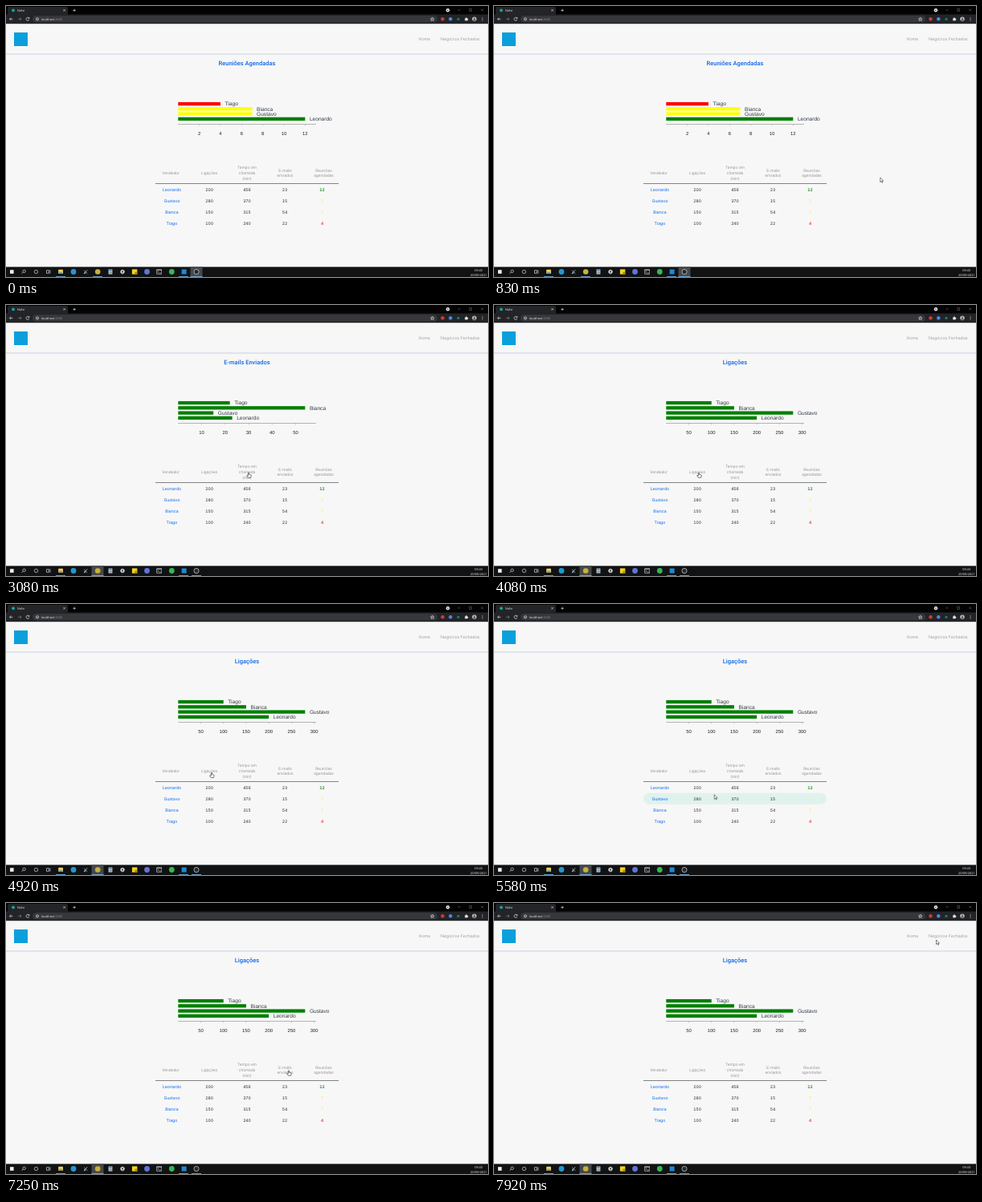
These frames come from a looping animation (600x338 px, 8 s). An HTML page:

```html
<!DOCTYPE html>
<html lang="pt-BR">
<head>
<meta charset="utf-8">
<title>Nolvi</title>
<style>
html, body { margin: 0; width: 100%; height: 100%; overflow: hidden; background: #f7f7f7; }
svg { display: block; width: 100vw; height: 100vh; }
text { font-family: Inter, sans-serif; text-rendering: geometricPrecision; }
.mid { text-anchor: middle; }
.nav { font-size: 5.25px; font-weight: 300; fill: #888; }
.head { font-size: 4.8px; font-weight: 300; fill: #777; }
.cell { font-size: 5px; fill: #222; font-variant-numeric: tabular-nums; }
.grade { font-weight: 600; }
.name { font-size: 5.2px; fill: #0a6cf0; }
.title { font: 500 7.5px Roboto, sans-serif; fill: #1066e6; }
.label { font: 6.6px "Liberation Sans", sans-serif; fill: #333c48; }
.tick { font: 5.9px "Liberation Sans", sans-serif; fill: #222; }
.ui { font: 3.9px "Open Sans", sans-serif; fill: #f0f0f0; }
.line { fill: none; stroke: #ddd; stroke-width: .7; }
</style>
</head>
<body>
<svg viewBox="0 0 600 338">
  <g id="page"></g>
  <g id="chart"></g>
  <g id="table"></g>
  <g id="browser"></g>
  <g id="taskbar"></g>
  <path id="arrow" d="M0 0V5.6L1.3 4.4 2.2 6.4 3.1 6 2.2 4.1H4Z" fill="#fff" stroke="#222" stroke-width=".55"/>
  <path id="hand" d="M-.6 .2Q0-.5 .6 .2V2.4L2.6 2.8Q3.4 3 3.3 3.8L2.7 6.3H-.7L-2.3 3.9Q-2.1 3-1.3 3.5L-.6 4Z" fill="#fff" stroke="#222" stroke-width=".6"/>
</svg>
<script>
const $ = id => document.getElementById(id);
const rect = (x, y, w, h, fill, r = 0) => `<rect x="${x}" y="${y}" width="${w}" height="${h}" rx="${r}" fill="${fill}"/>`;
const dot = (x, y, r, fill) => `<circle cx="${x}" cy="${y}" r="${r}" fill="${fill}"/>`;
const ring = (x, y, r) => `<circle class="line" cx="${x}" cy="${y}" r="${r}"/>`;
const line = d => `<path class="line" d="${d}"/>`;
const text = (x, y, s, cls, fill) => `<text x="${x}" y="${y}" class="${cls}"${fill ? ` style="fill:${fill}"` : ''}>${s}</text>`;

// calls, minutes, e-mails, meetings
const sellers = [
  ['Leonardo', 200, 456, 23, 12],
  ['Gustavo', 280, 370, 15, 7],
  ['Bianca', 150, 315, 54, 7],
  ['Tiago', 100, 240, 22, 4]
];
const charts = {
  1: ['Ligações', 50],
  2: ['Tempo em Chamada', 100],
  3: ['E-mails Enviados', 10],
  4: ['Reuniões Agendadas', 2]
};
const grade = n => n < 5 ? 'red' : n < 10 ? '#ff0' : 'green';

function drawPage() {
  $('page').innerHTML = rect(0, 22, 600, 304, '#f7f7f7') +
    rect(10, 33, 17, 17, '#0b9fdc') +
    text(513.5, 43, 'Home', 'nav') + text(541, 43, 'Negócios Fechados', 'nav') +
    rect(0, 59.6, 600, .8, '#b9c4dd');
}

function drawChart(col) {
  const [title, step] = charts[col];
  const x0 = 214.3, width = 171.7;
  const max = Math.max(...sellers.map(s => s[col]));
  const scale = 158 / max;
  let out = text(300, 74, title, 'title mid');
  sellers.forEach((s, i) => {
    const y = 140.85 - i * 6.26, w = s[col] * scale;
    out += rect(x0, y - 2.15, w, 4.3, col == 4 ? grade(s[4]) : 'green') +
      text(x0 + w + 5.6, y + 2.4, s[0], 'label');
  });
  out += rect(x0, 147.1, width, .7, '#999');
  for (let v = step; v * scale < width; v += step) {
    const x = x0 + v * scale;
    out += rect(x - .25, 147.5, .5, 1.8, '#999') + text(x, 161, v, 'tick mid');
  }
  $('chart').innerHTML = out;
}

function drawTable(hover) {
  const heads = [
    [205, 'Vendedor'], [253, 'Ligações'], [300, 'Tempo em', 'chamada', '(min)'],
    [347.5, 'E-mails', 'enviados'], [395.5, 'Reuniões', 'agendadas']
  ];
  const cols = [206.5, 253.2, 300, 347, 393.5];
  let out = '';
  for (const [x, ...lines] of heads)
    lines.forEach((s, i) => out += text(x, 210 + (i - (lines.length - 1) / 2) * 6.6, s, 'head mid'));
  out += rect(186, 221, 228, .8, '#666');
  sellers.forEach((s, r) => {
    const y = 228.7 + r * 14.05;
    if (r === hover) out += rect(186, y - 7, 228, 14, '#dff2ee', 7);
    s.forEach((v, c) => {
      const cls = c == 4 ? 'cell grade' : c ? 'cell' : 'name';
      const fill = c == 4 ? { red: '#e33', green: '#137c13' }[grade(v)] || '#f7ef6a' : '';
      out += text(cols[c], y + 1.8, v, cls + ' mid', fill);
    });
  });
  $('table').innerHTML = out;
}

function drawBrowser() {
  const bar = '#222427';
  $('browser').innerHTML = rect(0, 0, 600, 11, '#030303') + rect(2, 1, 75, 12, bar, 2) +
    rect(0, 10.5, 600, 11.7, bar) + rect(33, 12, 504, 8.6, '#35373b', 4.3) +
    dot(9, 5.4, 1.9, '#1aa6a6') + text(14, 6.9, 'Nolvi', 'ui') +
    line('M71.4 4.2l2.4 2.4m0-2.4l-2.4 2.4M83.4 5.4h3.4M85.1 3.7v3.4') +
    dot(550, 5.2, 2.2, '#eee') + dot(550, 5.2, .8, '#222') +
    `<g opacity=".4">${line('M562.5 5h3M576.8 3.6h2.8v2.8h-2.8zM591.4 3.7l2.6 2.6m0-2.6l-2.6 2.6')}</g>` +
    line('M8.5 16.3H4.5l1.8-1.8M4.5 16.3l1.8 1.8M28.6 15a2 2 0 1 0 .3 2M29 14v1.6h-1.6') +
    `<g opacity=".5">${line('M15 16.3h4l-1.8-1.8M19 16.3l-1.8 1.8')}</g>` +
    ring(39, 16.3, 1.6) + rect(38.7, 15.9, .6, 1.4, '#ddd') +
    text(44, 17.8, 'localhost<tspan fill="#8b8d91">:3000</tspan>', 'ui') +
    line('M530.7 14.2l.6 1.5 1.6.1-1.2 1 .4 1.6-1.4-.9-1.4.9.4-1.6-1.2-1 1.6-.1z') +
    dot(543.5, 16.3, 2.2, '#d33b35') + dot(553.3, 16.3, 2.2, '#4f86e8') + dot(563, 16.3, 1.6, '#188080') +
    rect(571.3, 15.2, 3.3, 3.1, '#eee', .4) + dot(573, 15, .8, '#eee') + dot(574.7, 16.7, .8, '#eee') +
    dot(583, 16.3, 2.7, '#ccc5bd') + dot(583, 15.6, 1, '#5e4b43') +
    '<path d="M581.2 18.3a1.8 1.8 0 0 1 3.6 0z" fill="#3d4250"/>' +
    [14.7, 16.3, 17.9].map(y => dot(593, y, .5, '#ddd')).join('');
}

function drawTaskbar(focus) {
  const y = 331.5, top = 325.4;
  let out = rect(0, top, 600, 13, '#101214') + rect(focus - 7.5, top, 15, 13, '#45484b');
  for (const x of [68, 114, 221, 237])
    out += rect(x - (x == focus ? 7.5 : 6), 337.2, x == focus ? 15 : 12, .8, '#76b9ed');
  out += rect(5, 329.2, 4.6, 4.6, '#eee') +
    ring(22.6, 330.8, 1.7) + line('M21.3 332l-1.7 1.8') + ring(37.5, y, 2.2) +
    line('M50.5 329.7h3v3.6h-3zM55 329.4v4.2') +
    rect(65.2, 328.8, 5.8, 5, '#f4cc57', .4) + rect(66.2, 331.8, 3.8, 2, '#4a9fdc') +
    dot(84, y, 3.4, '#2497cf') +
    line('M97.2 333.8l4-4.6M97.2 330l4 3.6') + dot(98, 333.2, 1, '#7fb8e6') +
    dot(114.2, y, 3.3, '#c9b03c') +
    rect(127.6, 328.4, 4.8, 6.2, '#c7d6e2', .4) + rect(128.4, 329.2, 3.2, 1.2, '#27649b') +
    [128.9, 130.7].map(x => rect(x, 331.5, .9, 2, '#456')).join('') +
    `<circle cx="145" cy="${y}" r="1.7" fill="none" stroke="#eee" stroke-width="1.3"/>` +
    `<circle cx="145" cy="${y}" r="2.6" fill="none" stroke="#eee" stroke-width=".7" stroke-dasharray="1 1.04"/>` +
    rect(156.9, 328.4, 6.4, 6.2, '#f7d51d') + rect(160.3, 331.7, 3, 2.9, '#a88b15') +
    dot(175.5, y, 3.4, '#6373d9') +
    rect(187.3, 328.6, 6.7, 5.8, '#dedede', .3) + rect(187.8, 329.6, 5.7, 4.3, '#17191c') +
    line('M188.7 330.8l1.2.9-1.2.9M190.8 333h1.7') +
    dot(206.3, y, 3.4, '#35b653') + rect(218.6, 328.5, 6, 6, '#2288d2') +
    dot(237, y, 3.1, '#24272b') + ring(237, y, 3.1) +
    text(588.3, 330.8, '09:43', 'ui mid') + text(588.3, 336.5, '20/09/2021', 'ui mid');
  $('taskbar').innerHTML = out;
}

// time, x, y of the pointer tip
const path = [
  [0, 238, 342], [150, 238, 342], [830, 480.8, 214], [1050, 480.5, 214],
  [2000, 351.5, 208.5], [2600, 351.5, 208.5], [3050, 302, 209], [3450, 301, 209],
  [3980, 255, 209], [4850, 255, 209], [5400, 274, 237.5], [5800, 274.5, 238],
  [6550, 282.3, 263], [7000, 282.3, 263], [7750, 549, 56], [7920, 550.5, 46], [8000, 550.5, 46]
];
function pointer(t) {
  const i = path.findIndex(p => p[0] > t);
  const [t0, x0, y0] = path[i - 1], [t1, x1, y1] = path[i];
  const u = (t - t0) / (t1 - t0), k = u * u * (3 - 2 * u);
  return [x0 + (x1 - x0) * k, y0 + (y1 - y0) * k];
}

// redraw a part only when its state changes
const state = {};
function update(key, value, draw) {
  if (state[key] === value) return;
  state[key] = value;
  draw(value);
}

function frame(now) {
  const t = now % 8000;
  const [x, y] = pointer(t);
  const inTable = x > 186 && x < 414;
  const onHead = inTable && x > 230 && y > 198 && y < 220;
  update('chart', t < 2250 ? 4 : t < 3330 ? 3 : t < 4060 ? 2 : 1, drawChart);
  update('hover', inTable ? Math.floor((y - 221.7) / 14.05) : -1, drawTable);
  update('focus', t < 2100 ? 237 : 114, drawTaskbar);
  $('arrow').style.display = onHead ? 'none' : '';
  $('hand').style.display = onHead ? '' : 'none';
  for (const id of ['arrow', 'hand']) $(id).setAttribute('transform', `translate(${x} ${y})`);
  requestAnimationFrame(frame);
}

// the calls chart opens shortly after the pointer rests on its heading
drawPage();
drawBrowser();
frame(performance.now());
</script>
</body>
</html>
```
